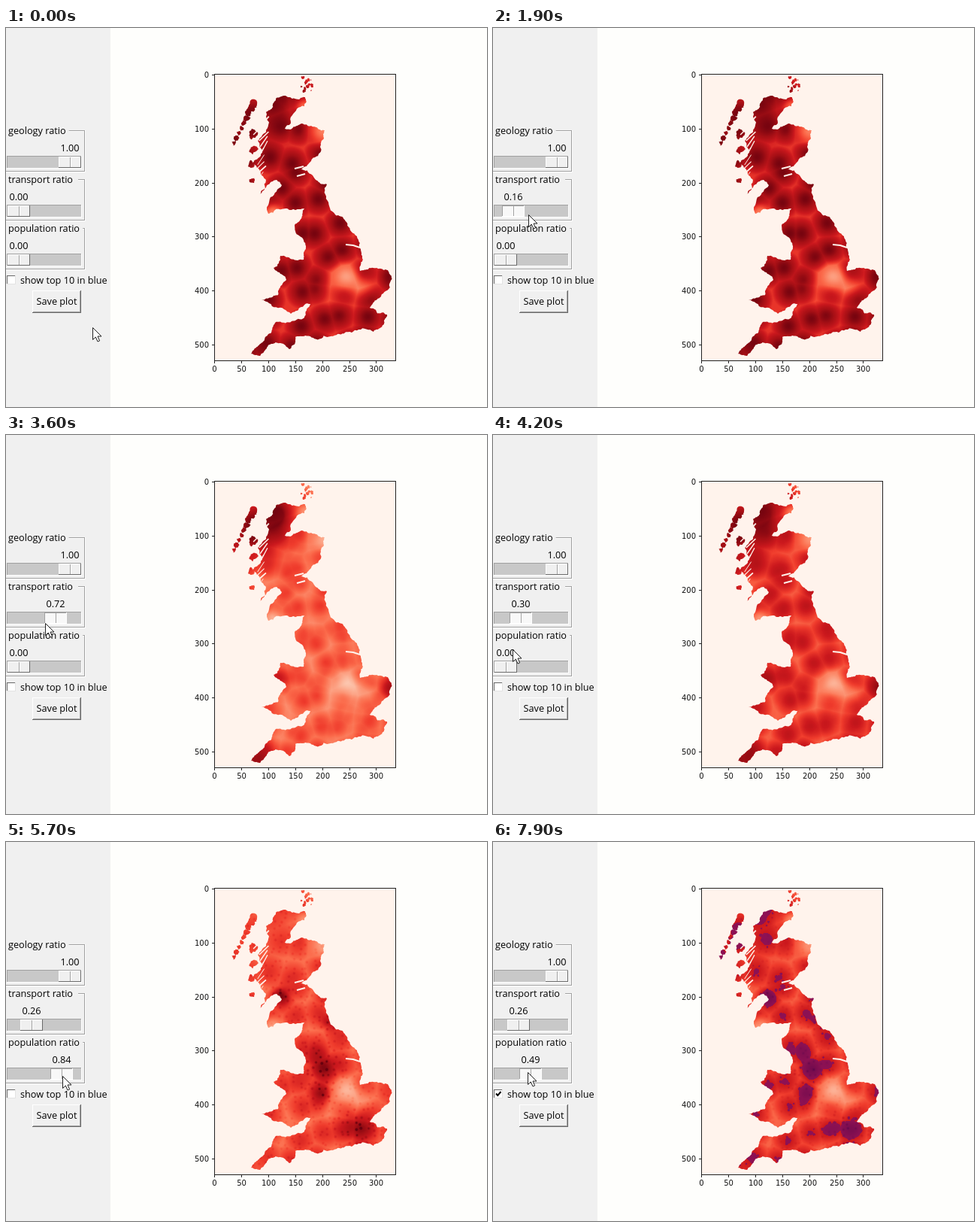
Recreate the animation shown at these times as an HTML page with a canvas. Size 640x504 px, loop 8 s.

```html
<!DOCTYPE html>
<html lang="en">
<head>
<meta charset="utf-8">
<title>Ratio map</title>
<style>
html, body { margin: 0; width: 100%; height: 100%; overflow: hidden; background: #fefefc; }
svg { position: absolute; left: 0; top: 0; }
canvas { position: absolute; left: 277px; top: 62px; background: #fff3ec; }
.ui { font: 12.7px "Open Sans", "Noto Sans", sans-serif; fill: #000; }
.axis { font: 10px "DejaVu Sans", sans-serif; fill: #111; }
</style>
</head>
<body>
<canvas id="map" width="241" height="380"></canvas>
<svg id="ui" width="640" height="504"></svg>
<script>
const LOOP = 8000, STEP = 100;
const X0 = 277, Y0 = 62, W = 241, H = 380;
const GREY = '#f0f0f0', WHITE = '#fff', SHADE = '#a0a0a0', EDGE = '#696969';
const ui = document.getElementById('ui');

function add(parent, tag, attrs, text) {
  const el = document.createElementNS('http://www.w3.org/2000/svg', tag);
  for (const k in attrs) el.setAttribute(k, attrs[k]);
  if (text !== undefined) el.textContent = text;
  parent.append(el);
  return el;
}
const box = (p, x, y, width, height, fill) => add(p, 'rect', { x, y, width, height, fill });
const line = (p, d, stroke) => add(p, 'path', { d, stroke, fill: 'none', 'shape-rendering': 'crispEdges' });
const label = (p, x, y, text, cls = 'ui', anchor = 'start') =>
  add(p, 'text', { x, y, class: cls, 'text-anchor': anchor }, text);

// A box with its upper left and lower right edges in two tones
function bevel(p, x, y, w, h, fill, upper, lower) {
  return {
    face: box(p, x, y, w, h, fill),
    upper: line(p, `M${x + .5} ${y + h}V${y + .5}H${x + w}`, upper),
    lower: line(p, `M${x + w - .5} ${y}V${y + h - .5}H${x}`, lower)
  };
}

// ---- panel and axes ----
const TRAVEL = 68, REST = 17;
box(ui, 0, 0, 139, 504, GREY);

function makeSlider(title, top) {
  line(ui, `M0 ${top + .5}H104.5V${top + 54.5}H0`, SHADE);
  line(ui, `M0 ${top + 1.5}H103.5 M105.5 ${top}V${top + 55.5}H0`, WHITE);
  box(ui, 0, top - 4, title.length * 6.2 + 3, 10, GREY);
  label(ui, 3, top + 5, title);
  bevel(ui, 1, top + 34, 100, 17, '#c8c8c8', SHADE, WHITE);
  const thumb = add(ui, 'g', {});
  const face = bevel(thumb, 0, top + 35, 30, 15, GREY, WHITE, EDGE);
  line(thumb, `M15.5 ${top + 36}V${top + 49}`, SHADE);
  line(thumb, `M16.5 ${top + 36}V${top + 49}`, WHITE);
  const value = label(thumb, 15, top + 28, '', 'ui', 'middle');
  return (v, pressed) => {
    thumb.setAttribute('transform', `translate(${Math.round(REST - 15.4 + TRAVEL * v)} 0)`);
    value.textContent = v.toFixed(2);
    face.face.setAttribute('fill', pressed ? '#f8f8f8' : GREY);
    face.upper.setAttribute('stroke', pressed ? SHADE : WHITE);
    face.lower.setAttribute('stroke', pressed ? WHITE : EDGE);
  };
}
const [setGeology, setTransport, setPopulation] =
  ['geology', 'transport', 'population'].map((name, i) => makeSlider(name + ' ratio', 136 + 65 * i));

bevel(ui, 1, 329, 12, 12, WHITE, EDGE, '#e3e3e3');
const tick = add(ui, 'path', { d: 'M4 334.5L6.3 337L10.5 332', stroke: '#000', 'stroke-width': 2, fill: 'none' });
label(ui, 19, 340, 'show top 10 in blue');
bevel(ui, 35, 349, 65, 30, GREY, WHITE, EDGE);
line(ui, 'M98.5 350V377.5H36', SHADE);
label(ui, 67.5, 368, 'Save plot', 'ui', 'middle');

line(ui, 'M277.5 61.5H518.5V442.5H277.5Z', '#222');
const SCALE = 0.718;
for (let v = 0; v <= 500; v += 100) {
  const y = Math.round(Y0 + v * SCALE);
  line(ui, `M274 ${y + .5}H277`, '#222');
  label(ui, 270, y + 4, v, 'axis', 'end');
}
for (let v = 0; v <= 300; v += 50) {
  const x = Math.round(X0 + v * SCALE);
  line(ui, `M${x + .5} 443V446`, '#222');
  label(ui, x + .5, 457, v, 'axis', 'middle');
}
const cursor = add(ui, 'path', { d: 'M.5 .5V16.5L4.3 13L7 19L9.6 17.9L7 12H12Z', fill: WHITE, stroke: '#222' });

// ---- land ----
let seed = 11;
const rnd = () => (seed = (seed * 16807) % 2147483647) / 2147483647;

// Capes and bays, clockwise from the north west
const COAST = `359,94 381,94 398,92 397,104 371,134 385,131 406,130 424,136 418,158 405,178 392,188 408,196
  427,208 438,248 453,258 470,291 475,308 471,323 484,319 508,322 511,345 497,359 484,372 507,381 503,390
  489,404 450,406 432,410 398,409 385,411 378,427 364,419 346,427 338,436 326,433 342,417 358,392 385,389
  405,367 379,380 340,362 362,355 373,335 356,319 365,303 396,308 399,290 384,262 397,240 372,240 349,247
  367,209 360,202 338,221 346,202 328,181 341,165 335,150 350,125 346,112`
  .trim().split(/\s+/).map(p => p.split(',').map(Number));

// Splits an edge at a shifted midpoint to roughen it
function rough(path, [ax, ay], [bx, by], depth) {
  if (!depth) return path.lineTo(bx, by);
  const s = (rnd() - .5) * .36;
  const mid = [(ax + bx) / 2 - (by - ay) * s, (ay + by) / 2 + (bx - ax) * s];
  rough(path, [ax, ay], mid, depth - 1);
  rough(path, mid, [bx, by], depth - 1);
}
function shape(points) {
  const path = new Path2D();
  path.moveTo(...points[0]);
  points.forEach((p, i) => rough(path, p, points[(i + 1) % points.length], 4));
  return path;
}
function island(x, y, r) {
  return shape(Array.from({ length: 7 }, (_, i) => {
    const a = i * Math.PI * 2 / 7, d = r * (.6 + .7 * rnd());
    return [x + d * Math.cos(a), y + d * Math.sin(a)];
  }));
}
function landMask() {
  const c = document.createElement('canvas');
  c.width = W; c.height = H;
  const g = c.getContext('2d');
  g.translate(-X0, -Y0);
  g.fill(shape(COAST));
  // Outer chain, inner isles and the far north
  for (let i = 0; i < 9; i++)
    g.fill(island(329 - i * 3.2, 100 + i * 6.6, i < 4 ? 6.5 - i * .4 : 3.2));
  for (let i = 0; i < 4; i++)
    g.fill(island(328 + 2 * Math.sin(i * 2), 140 + i * 21, 7 - i));
  for (let i = 0; i < 18; i++)
    g.fill(island(393 + rnd() * 15, 65 + rnd() * 19, .8 + rnd() * 2));
  // Sea lochs slanting into the west coast
  g.globalCompositeOperation = 'destination-out';
  for (let y = 112; y < 216; y += 8) {
    const x = 328 + rnd() * 12;
    g.lineWidth = .8 + rnd();
    g.beginPath();
    g.moveTo(x, y + 6);
    g.lineTo(x + 8 + rnd() * 10, y - 5 - rnd() * 6);
    g.stroke();
  }
  g.lineWidth = 2;
  g.stroke(new Path2D('M452 288L462 289L471 292M384 187L396 184M387 197L398 194'));
  return g.getImageData(0, 0, W, H).data;
}

// ---- data layers ----
const hash = (x, y) => { const s = Math.sin(x * 127.1 + y * 311.7) * 43758.5453; return s - Math.floor(s); };

// Distance to the nearest of the points scattered one to a cell
function nearest(x, y, size) {
  const ci = Math.floor(x / size), cj = Math.floor(y / size);
  let best = Infinity;
  for (let i = ci - 1; i <= ci + 1; i++)
    for (let j = cj - 1; j <= cj + 1; j++)
      best = Math.min(best, Math.hypot((i + .15 + .7 * hash(i, j)) * size - x, (j + .15 + .7 * hash(j, i + 9)) * size - y));
  return best / size;
}
// Spots are [x, y, radius, strength]
const spots = (list, x, y) => list.reduce((s, [a, b, r, k]) =>
  s + k * Math.exp(-((x - a) ** 2 + (y - b) ** 2) / (r * r)), 0);

const LIGHT = [[452, 331, 16, .5], [418, 135, 16, .5], [354, 243, 12, .4], [395, 102, 10, .25], [476, 343, 16, .25], [440, 345, 26, .15]];
const REMOTE = [[332, 125, 42, 1], [362, 104, 20, .7], [334, 432, 24, .9], [358, 322, 14, .5], [514, 337, 16, .8]];
const CITIES = [[365, 203, 11, .42], [430, 240, 10, .35], [418, 296, 21, .42], [421, 334, 13, .38], [466, 379, 19, .44]];

const mask = landMask();
const geology = new Float32Array(W * H), transport = new Float32Array(W * H), population = new Float32Array(W * H);
for (let i = 0; i < W * H; i++) {
  if (!mask[i * 4 + 3]) continue;
  const x = X0 + i % W, y = Y0 + Math.floor(i / W);
  const far = Math.min(1, spots(REMOTE, x, y));
  const town = Math.max(0, 1 - nearest(x, y, 9) * 3.5);
  geology[i] = .03 + (.32 - .2 * far) * Math.min(1, 1.5 * nearest(x, y, 31) ** 1.6) + spots(LIGHT, x, y);
  transport[i] = (.38 + .14 * nearest(x + 50, y, 24)) * (1 - far);
  population[i] = .21 + .2 * far - spots(CITIES, x, y) * (.85 + .4 * town) - .07 * town;
}

// ---- map drawing ----
const REDS = ['67000d', 'a50f15', 'cb181d', 'ef3b2c', 'fb6a4a', 'fc9272', 'fcbba1', 'fee0d2', 'fff5f0']
  .map(h => [0, 2, 4].map(i => parseInt(h.slice(i, i + 2), 16)));
const BLUE = [70, 10, 150], TOP = .25;
const mix = (a, b, k) => a.map((v, i) => v + (b[i] - v) * k);
const COLOURS = Array.from({ length: 256 }, (_, i) => {
  const p = i / 255 * 8, n = Math.min(7, Math.floor(p));
  return mix(REDS[n], REDS[n + 1], p - n);
});
const TINTED = COLOURS.map((c, i) => i < TOP * 255 ? mix(c, BLUE, .45) : c);
const ctx = document.getElementById('map').getContext('2d');
const image = ctx.createImageData(W, H);
let drawn = '';

function drawMap(wt, wp, blue) {
  const key = [wt, wp, blue].join();
  if (key === drawn) return;
  drawn = key;
  const colours = blue ? TINTED : COLOURS;
  const keep = 1 - .5 * wt - .25 * wp;
  for (let i = 0; i < W * H; i++) {
    if (!mask[i * 4 + 3]) continue;
    const v = geology[i] * keep + transport[i] * wt + population[i] * wp;
    image.data.set(colours[Math.round(255 * Math.max(0, Math.min(1, v)))], i * 4);
    image.data[i * 4 + 3] = mask[i * 4 + 3];
  }
  ctx.putImageData(image, 0, 0);
}

// ---- motion ----
// Pointer path as [time, x, y]; the sliders follow it
const POINTER = [[0, 115, 398], [1200, 17, 244], [1430, 17, 246], [1900, 47, 248], [2530, 87, 250], [2850, 87, 251],
  [3600, 52, 250], [3960, 34.7, 248], [4350, 20, 308], [4550, 17, 308], [4700, 52, 307], [5000, 78, 306],
  [5400, 74, 310], [5700, 75, 311], [6100, 50.3, 312], [6400, 50.3, 312], [6800, 59, 336], [7100, 59, 335],
  [7700, 46, 307], [7900, 46, 306]];
const LAG = 300, REDRAW = 200;
const DRAG_T = [1430, 3960], DRAG_P = [4550, 6100], CHECK = 6900;

function pointer(t) {
  const i = POINTER.findIndex(p => p[0] > t);
  if (i < 0) return POINTER[POINTER.length - 1].slice(1);
  const a = POINTER[i - 1], b = POINTER[i];
  return mix(a, b, (t - a[0]) / (b[0] - a[0])).slice(1);
}
// A dragged thumb trails the pointer and stays where it is let go
function dragged([from, to], t) {
  if (t - LAG < from) return 0;
  const x = pointer(Math.min(t - LAG, to))[0];
  return Math.max(0, Math.min(1, (x - REST) / TRAVEL));
}
const held = ([from, to], t) => t >= from && t < to + LAG;

setGeology(1, false);
function show(t) {
  const [x, y] = pointer(t);
  cursor.setAttribute('transform', `translate(${Math.round(x)} ${Math.round(y)})`);
  setTransport(dragged(DRAG_T, t), held(DRAG_T, t));
  setPopulation(dragged(DRAG_P, t), held(DRAG_P, t) || t >= 7700);
  tick.setAttribute('visibility', t >= CHECK ? 'visible' : 'hidden');
  drawMap(dragged(DRAG_T, t - REDRAW), dragged(DRAG_P, t - REDRAW), t >= CHECK + LAG + REDRAW);
}
const start = performance.now();
function frame() {
  const t = (performance.now() - start) % LOOP;
  show(Math.floor(t / STEP) * STEP);
  requestAnimationFrame(frame);
}
frame();
</script>
</body>
</html>
```
